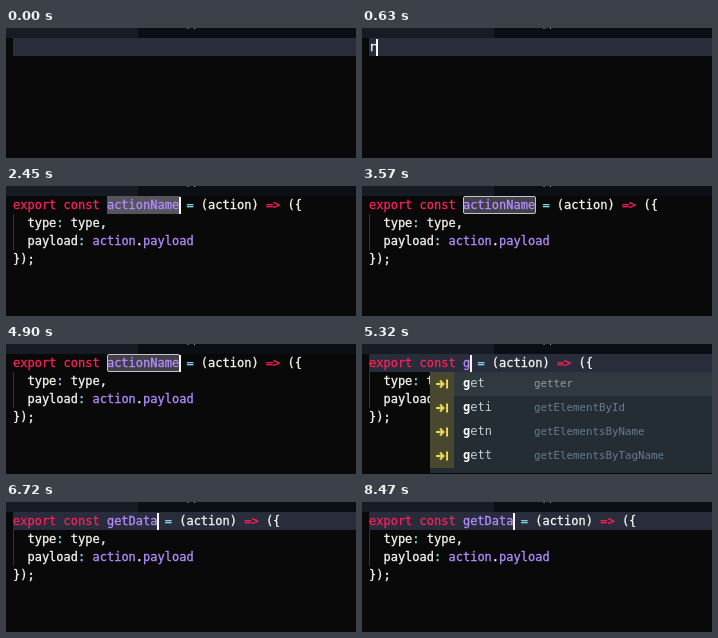
Write an HTML page that moves like this. It is 350 px wide and 130 px high and loops after 8.75 s.

```html
<!DOCTYPE html>
<html lang="en">
<head>
<meta charset="utf-8">
<style>
html, body { margin: 0; width: 100%; height: 100%; overflow: hidden; background: #090909; }
#stage { position: absolute; width: 350px; height: 130px; overflow: hidden;
  font: 12px/18px "DejaVu Sans Mono", monospace; color: #f6f6f2; }
#stage div { position: absolute; white-space: pre; }
#bar { width: 350px; height: 10px; background: #0b0f15; overflow: hidden; }
#tab { width: 132px; height: 10px; background: #171c24; }
#file { left: 174px; top: -13px; font-size: 10.8px; color: #a4a8ad; }
#line { left: 7px; top: 10px; width: 343px; height: 18px; background: #292c3b; }
#guide { left: 7px; top: 28px; width: 1px; height: 36px; background: #343438; }
#sel { left: 101px; top: 10px; width: 73px; height: 18px; box-sizing: border-box; background: #55555b; }
#sel.field { background: #414147; border: 1px solid #c4c4c8; border-radius: 2px; }
#code { left: 7px; top: 10px; -webkit-text-stroke: .3px; }
#caret { top: 11px; width: 2px; height: 17px; background: #f8f8f0; }
#pop { top: 28px; background: #252d34; overflow: hidden; }
#pop .row { left: 0; width: 100%; height: 24px; line-height: 23px; color: #c3ccd0; }
#pop .row:first-child { background: #30393f; }
#pop .icon { width: 24px; height: 24px; background: #48472f; }
#pop svg { position: absolute; left: 6px; top: 6px; }
#pop .label { left: 33px; }
#pop b { color: #fff; }
#pop .info { font-size: 10.8px; color: #667d8b; }
#pop .row:first-child .info { color: #8d9ca5; }
.k { color: #f92259; }
.n { color: #b48cff; }
.o { color: #7fdcee; }
</style>
</head>
<body>
<div id="stage">
  <div id="bar"><div id="tab"></div><div id="file">app</div></div>
  <div id="line"></div>
  <div id="guide"></div>
  <div id="sel"></div>
  <div id="code"></div>
  <div id="caret"></div>
  <div id="pop"></div>
</div>
<script>
const LOOP = 8750, STEP = 70, BLINK = 420, CHAR = 7.224, LEFT = 7;
const EXPAND = 2380, RENAME = 5250;
const el = id => document.getElementById(id);
const show = (id, on) => el(id).style.display = on ? 'block' : 'none';
const span = (kind, text) => `<span class="${kind}">${text}</span>`;

const prefixKeys = { text: 'rxa', times: [560, 770, 2030] };
const nameKeys = { text: 'getData', times: [5250, 5390, 5530, 6020, 6230, 6440, 6650] };
const typed = (keys, t) => keys.text.slice(0, keys.times.filter(k => k <= t).length);

const snippets = {
  col: 0, info: 110, width: 315,
  items: [['rxaction', 'Snippet Name'], ['rxconst', 'Redux conts'],
    ['rxgen', 'redux-saga Generator Function'], ['rxreducer', 'Redux reducer']]
};
const getters = {
  col: 13, info: 104, width: 315,
  items: [['get', 'getter'], ['geti', 'getElementById'],
    ['getn', 'getElementsByName'], ['gett', 'getElementsByTagName']]
};
const arrow = '<svg width="13" height="12" fill="none" stroke="#e8d75c" stroke-width="2">' +
  '<path d="M0 6h7M4 2.5L7.5 6L4 9.5M11 1.5v9"/></svg>';

function snippet(name) {
  return span('k', 'export const ') + span('n', name) + span('o', ' = ') + '(action) ' + span('k', '=&gt;') + ' ({\n' +
    '  type' + span('o', ':') + ' type,\n' +
    '  payload' + span('o', ':') + ' ' + span('n', 'action') + '.' + span('n', 'payload') + '\n});';
}

function popup(list, query) {
  const items = list.items.filter(([label]) => label.startsWith(query));
  const style = el('pop').style;
  style.left = Math.round(LEFT + list.col * CHAR) - 33 + 'px';
  style.width = list.width + 'px';
  style.height = items.length * 24 + 5 + 'px';
  el('pop').innerHTML = items.map(([label, info], i) =>
    `<div class="row" style="top:${i * 24}px"><div class="icon">${arrow}</div>` +
    `<div class="label"><b>${query}</b>${label.slice(query.length)}</div>` +
    `<div class="info" style="left:${list.info}px">${info}</div></div>`).join('');
}

function render(t) {
  const expanded = t >= EXPAND, picked = expanded && t < RENAME;
  const name = picked ? 'actionName' : typed(nameKeys, t);
  const prefix = typed(prefixKeys, t);

  el('code').innerHTML = expanded ? snippet(name) : prefix;
  show('line', !picked);
  show('guide', expanded);
  show('sel', picked);
  el('sel').className = t >= 2520 ? 'field' : '';

  // The caret restarts its blink on every key press.
  const resets = [140, ...prefixKeys.times, 2310, ...nameKeys.times].filter(k => k <= t);
  const since = t - resets[resets.length - 1];
  show('caret', resets.length && Math.floor(since / BLINK) % 2 === 0);
  const col = expanded ? 13 + name.length : prefix.length;
  el('caret').style.left = Math.round(LEFT + col * CHAR) + 'px';

  // Suggestions lag one step behind the typing.
  const early = t >= 840 && !expanded, late = t >= 5320 && t < 6090;
  show('pop', early || late);
  if (early) popup(snippets, typed(prefixKeys, t - STEP));
  if (late) popup(getters, typed(nameKeys, t - STEP));
}

let last = -1;
const start = performance.now();
function tick() {
  const t = Math.floor((performance.now() - start) % LOOP / STEP) * STEP;
  if (t !== last) render(last = t);
  requestAnimationFrame(tick);
}
tick();
</script>
</body>
</html>
```
